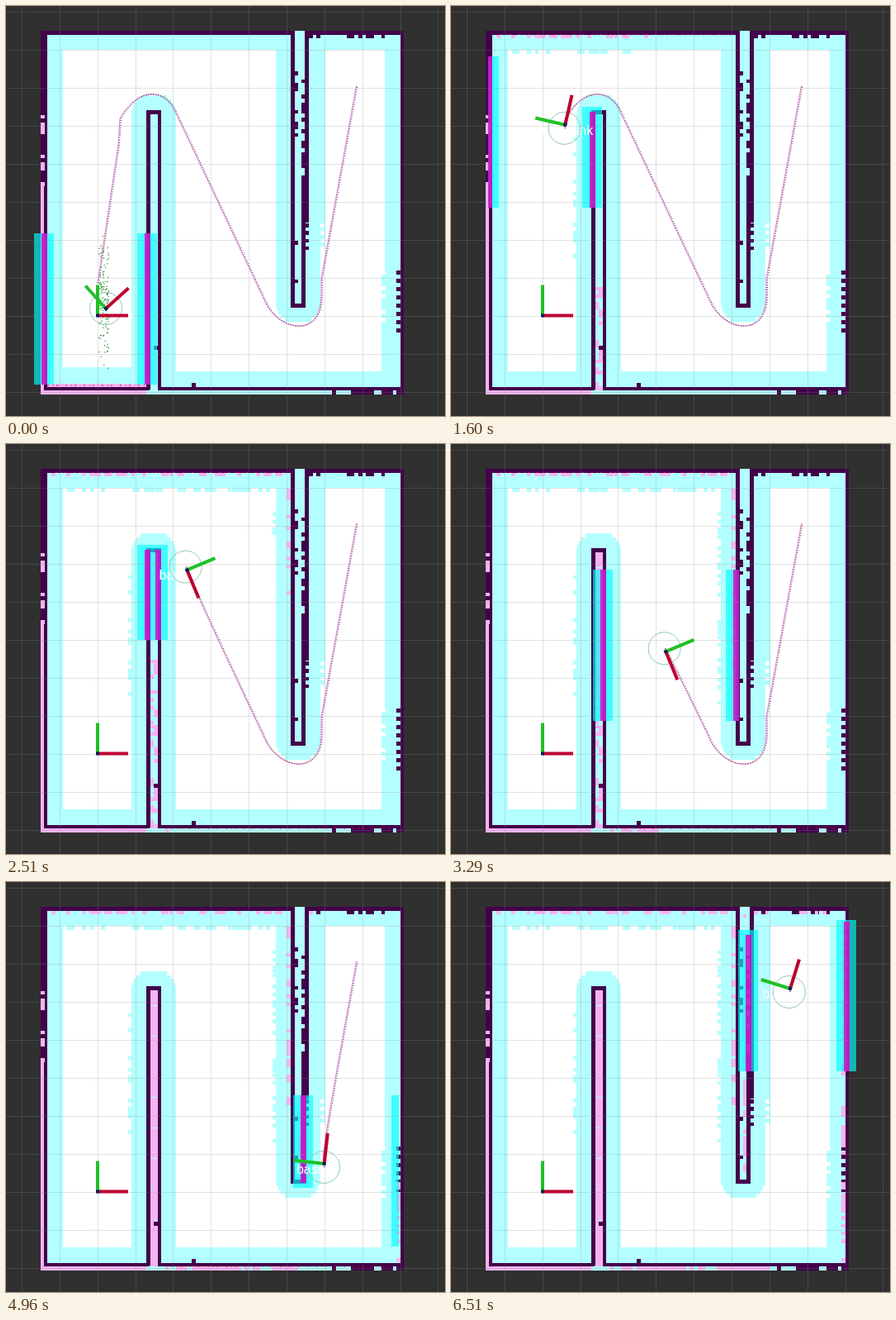
Animation, 532 px wide and 496 px high, one loop 6560 ms. Source, as an HTML page:

```html
<!DOCTYPE html>
<html lang="en">
<head>
<meta charset="utf-8">
<title>Navigation map</title>
<style>
html, body { margin: 0; width: 100%; height: 100%; overflow: hidden; background: #303030; }
svg { display: block; }
text { font: 16px "Liberation Sans", Arial, sans-serif; }
</style>
</head>
<body>
<svg id="stage" width="532" height="496" viewBox="0 0 532 496"></svg>
<script>
const LOOP = 6560, STEP = 70, LAST = 6510, CELL = 4.59;
const DARK = '#43004a', FREE = '#ffffff', PALE = '#b3ffff', PINK = '#f5b4f0';
const stage = document.getElementById('stage');
const timed = [];

let seed = 7;
const random = () => (seed = (seed * 16807) % 2147483647) / 2147483647;

function set(node, attrs) {
  for (const key in attrs) node.setAttribute(key, attrs[key]);
  return node;
}
function add(parent, tag, attrs = {}) {
  const node = document.createElementNS('http://www.w3.org/2000/svg', tag);
  return parent.appendChild(set(node, attrs));
}
// Rectangle given by its edges.
const box = (parent, fill, x1, y1, x2, y2) =>
  add(parent, 'rect', { x: x1, y: y1, width: x2 - x1, height: y2 - y1, fill });
const during = (node, from, to = LOOP) => (timed.push({ node, from, to }), node);

const map = add(stage, 'g', { 'shape-rendering': 'crispEdges' });
const fill = (color, ...edges) => box(map, color, ...edges);

// Random cells along a line; they appear in order between two times.
function cells(color, x1, y1, x2, y2, chance, from = 0, to = from, pitch = 1) {
  const count = Math.floor(Math.hypot(x2 - x1, y2 - y1) / CELL / pitch);
  for (let i = 0; i < count; i++) {
    if (random() > chance) continue;
    const k = i / count, x = x1 + (x2 - x1) * k, y = y1 + (y2 - y1) * k;
    during(fill(color, x, y, x + CELL, y + CELL), from + (to - from) * k);
  }
}
function roundCap(center, edge, direction) {
  for (let k = 0; k < 5; k++) {
    const half = 9 + 18 * Math.sqrt(1 - ((4.6 - k) / 5) ** 2);
    const a = edge + direction * k * CELL, b = a + direction * CELL;
    fill(PALE, center - half, Math.min(a, b), center + half, Math.max(a, b));
  }
}

function drawFloor() {
  fill(PALE, 42, 30, 482, 470);
  fill(FREE, 69, 53, 327, 442);
  fill(FREE, 327, 362, 387, 442);
  fill(FREE, 387, 53, 459, 320);
  fill(FREE, 381, 295, 455, 442);
  fill(PALE, 152, 130, 206, 442);
  roundCap(179, 108, 1);
  roundCap(354, 382, -1);
  during(fill(PALE, 69, 437, 152, 442), 0, 500);
  during(fill(PINK, 50, 457, 170, 461), 0, 500);
  cells(FREE, 455, 320, 455, 396, .7, 0, 0, 2);
  cells(FREE, 381, 263, 381, 300, 1, 0, 0, 2);
  cells(PALE, 69, 53, 320, 53, .5, 300, 2400);
  cells(PALE, 322.5, 50, 322.5, 320, .4, 2300, 3300);
  cells(PALE, 147.5, 300, 147.5, 135, .35, 300, 1300);
}
function drawWalls() {
  // outer
  fill(DARK, 42, 30, 345, 34.5);
  fill(DARK, 362, 30, 482, 34.5);
  fill(DARK, 42, 30, 50, 465);
  fill(DARK, 477.5, 30, 482, 470);
  fill(DARK, 46, 460.5, 174, 465);
  fill(DARK, 184, 460.5, 478, 465);
  fill(PINK, 42, 218, 46, 470);
  fill(PINK, 42, 465, 170, 470);
  cells(PINK, 42, 122, 42, 218, .5);
  cells(DARK, 367, 34.5, 478, 34.5, .35);
  cells(DARK, 386, 465, 478, 465, .55);
  cells(DARK, 473, 320, 473, 400, 1, 0, 0, 2);
  // left partition
  fill(DARK, 170, 126, 188, 131);
  fill(DARK, 170, 126, 174.5, 464);
  fill(DARK, 183.5, 126, 188, 464);
  // right partition
  fill(DARK, 345, 30, 349.5, 364);
  fill(DARK, 345, 360, 362.5, 364.5);
  fill(DARK, 358, 205, 362.5, 364);
  fill(DARK, 362, 30, 367, 262);
  cells(DARK, 362.5, 263, 362.5, 300, 1, 0, 0, 2);
  cells(DARK, 349.5, 70, 349.5, 340, .18);
  cells(DARK, 358, 70, 358, 205, .5);
}
function drawSeenCells() {
  for (const x of [174.5, 179]) {
    cells(PINK, x, 460, x, 131, .5, 300, 3800);
    cells(PINK, x, 131, x, 464, 1, 2600, 3900);
  }
  cells(PINK, 55, 34.5, 340, 34.5, .5, 200, 2400);
  cells(PINK, 340, 40, 340, 320, .3, 2200, 2800);
  cells(PINK, 188, 465.3, 386, 465.3, .8, 2300, 5500);
  cells(PINK, 353.5, 355, 353.5, 34, .5, 4700, 6400);
  cells(PINK, 473, 455, 473, 40, .5, 4600, 6000);
  cells(PINK, 367, 34.5, 473, 34.5, .35, 4800, 6400);
  fill(DARK, 179, 411, 183.6, 415.6);
  fill(DARK, 225, 456, 229.6, 460.6);
}
drawFloor();
drawWalls();
drawSeenCells();

function scan(y, x1, x2, from, to) {
  during(add(stage, 'path', {
    d: `M${x1} ${y}H${x2}`, stroke: '#c01048', 'stroke-dasharray': '2 5 1 3 2 9'
  }), from, to);
}
scan(34.5, 60, 340, 500, 4300);
scan(459, 50, 170, 0, 500);
scan(465, 200, 470, 2300, 5800);

// Local costmap: wall faces inflated inside a square window around the robot.
const defs = add(stage, 'defs');
const view = add(add(defs, 'clipPath', { id: 'window' }), 'rect', { width: 183, height: 183 });
const layer = opacity => add(stage, 'g', {
  'clip-path': 'url(#window)', 'shape-rendering': 'crispEdges', opacity
});
const inflated = layer(.65), lethal = layer(.82);
function face(vertical, at, start, end, from, to) {
  const grow = (group, color, side, tip) => {
    const across = [at - side, at + side], along = [start - tip, end + tip];
    const [x, y] = vertical ? [across, along] : [along, across];
    during(box(group, color, x[0], y[0], x[1], y[1]), from, to);
  };
  grow(inflated, '#00ffff', 12, 6);
  grow(lethal, '#e000c8', 3.5, 0);
}
face(true, 46, 34, 466, 0, 2300);
face(true, 171, 128, 461, 0, 2700);
face(false, 33, 50, 345, 1650, 2900);
face(true, 184, 128, 462, 1750, 4050);
face(true, 345, 36, 364, 2300, 4950);
face(false, 464, 190, 478, 4300, 4850);
face(true, 360, 64, 364, 4650, LOOP);
face(true, 479, 48, 455, 4600, LOOP);

let gridLines = '';
for (let i = 0; i < 12; i++)
  gridLines += `M${Math.round(19 + i * 45.85) + .5} 0V496M0 ${Math.round(7 + i * 45.95) + .5}H532`;
add(stage, 'path', { d: gridLines, stroke: '#8c8c8c', 'stroke-opacity': .25, fill: 'none' });

// The robot drives its route at constant speed; the plan is a separate curve.
const route = add(defs, 'path', {
  d: 'M121 366C126 330 133 310 133 279L136 165C138 90 195 90 215 142L300 347C325 400 380 400 386 338Q397 172 411 129'
});
const plan = add(defs, 'path', {
  d: 'M111 335L136 168 138 136C160 98 192 98 206 130L316 362C335 395 382 400 382 350V330L425 94'
});
const routeLength = route.getTotalLength();
const planPoints = [];
for (let s = 0; s < plan.getTotalLength(); s += 3) planPoints.push(plan.getPointAtLength(s));

const positionAt = t => route.getPointAtLength(routeLength * Math.max(0, Math.min(1, t / LAST)));
function headingAt(t) {
  const a = positionAt(Math.min(t, LAST - 20)), b = positionAt(Math.min(t, LAST - 20) + 20);
  const turn = 40 * Math.max(0, 1 - t / 250);
  return Math.atan2(b.y - a.y, b.x - a.x) * 180 / Math.PI + turn;
}
// Remaining plan, bent so that it begins at the robot.
function planFrom(robot, t) {
  const distance = p => Math.hypot(p.x - robot.x, p.y - robot.y);
  let first = 0;
  planPoints.forEach((p, i) => { if (distance(p) < distance(planPoints[first])) first = i; });
  const pull = Math.min(1, t / 400);
  const dx = (robot.x - planPoints[first].x) * pull, dy = (robot.y - planPoints[first].y) * pull;
  return 'M' + planPoints.slice(first).map((p, i) => {
    const fade = Math.exp(-i / 15);
    return `${(p.x + dx * fade).toFixed(1)} ${(p.y + dy * fade).toFixed(1)}`;
  }).join('L');
}

const planLine = add(stage, 'path', { fill: 'none', stroke: '#ee70d4' });
const planDots = add(stage, 'path', {
  fill: 'none', stroke: '#242028', 'stroke-width': 1.4, 'stroke-dasharray': '1 2',
  opacity: .75, transform: 'translate(1.3 0)'
});

const cloud = during(add(stage, 'g'), 0, 350);
for (let i = 0; i < 140; i++) {
  const spread = (random() + random() + random() - 1.5) / 1.5;
  const x = 118 + (random() - .5) * 12, y = 358 + spread * 100;
  box(cloud, '#158a20', x, y, x + 1.2, y + 1.2);
}

const label = add(stage, 'text', { fill: '#ffffff', 'text-anchor': 'middle' });
label.textContent = 'base_link';
const footprint = add(stage, 'circle', { r: 19.5, fill: 'none', stroke: '#8fc8b8' });

function axes() {
  const g = add(stage, 'g');
  box(g, '#20c028', -2, -37, 2, 0);
  box(g, '#bd0030', 0, -2, 37, 2);
  box(g, '#082058', -2, -2, 2, 2);
  return g;
}
set(axes(), { transform: 'translate(111 374.5)' });
const robot = axes();

function render(t) {
  const here = positionAt(t), trail = positionAt(t - 30), center = positionAt(t - 60);
  for (const { node, from, to } of timed)
    node.setAttribute('visibility', t >= from && t < to ? 'visible' : 'hidden');
  set(view, { x: Math.round(center.x - 91.5), y: Math.round(center.y - 91) });
  const d = planFrom(trail, t);
  set(planLine, { d });
  set(planDots, { d });
  set(label, { x: here.x, y: here.y + 12 });
  set(footprint, { cx: trail.x, cy: trail.y });
  set(robot, { transform: `translate(${here.x} ${here.y}) rotate(${headingAt(t)})` });
}

const start = performance.now();
function tick() {
  const t = (performance.now() - start) % LOOP;
  render(Math.floor((t + 10) / STEP) * STEP);
  requestAnimationFrame(tick);
}
render(0);
requestAnimationFrame(tick);
</script>
</body>
</html>
```
